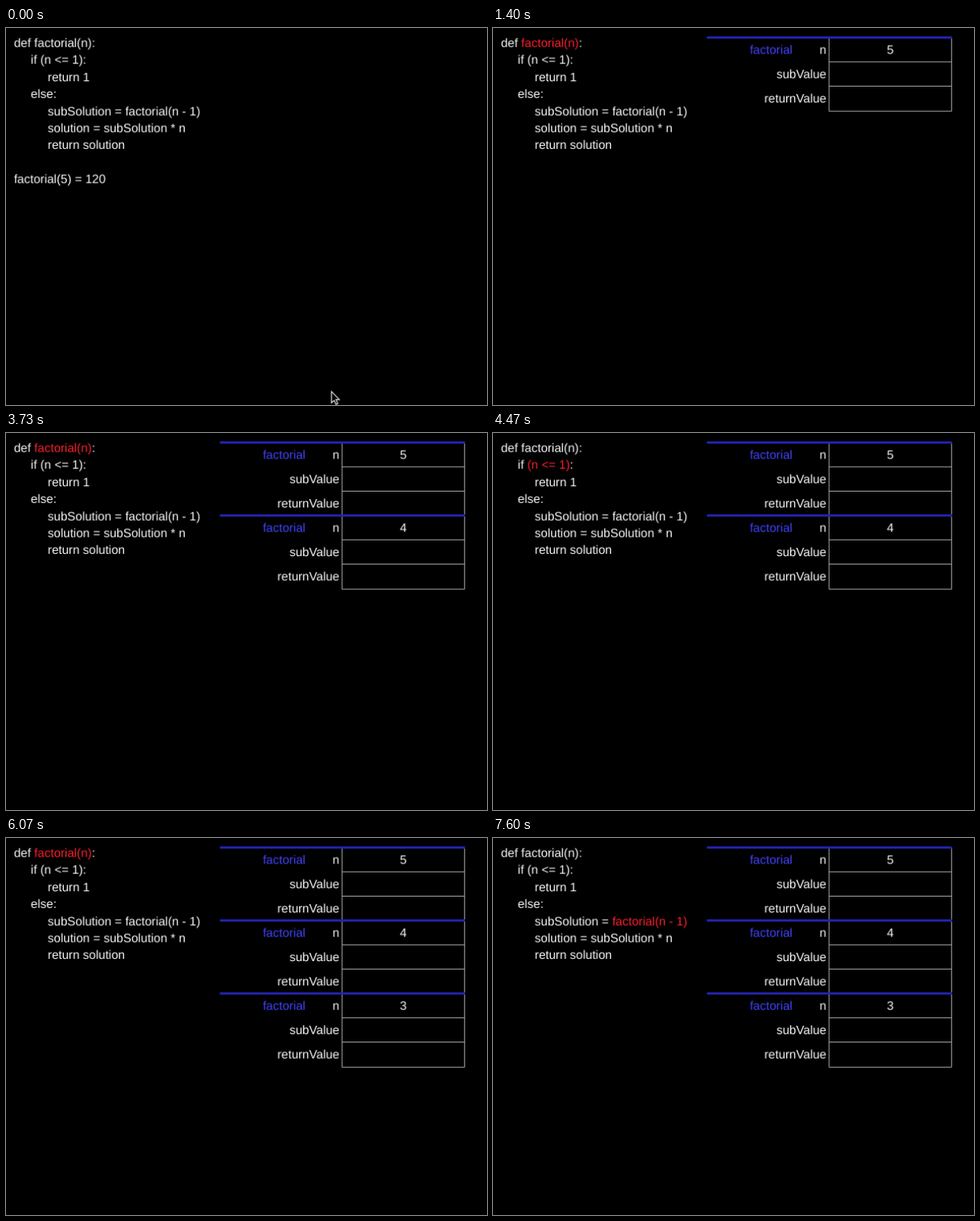
These frames come from a looping animation (640x502 px, 8000 ms). An HTML page with a canvas:

```html
<!DOCTYPE html>
<html lang="en">
<head>
<meta charset="utf-8">
<title>Factorial recursion</title>
<style>
  html, body { margin: 0; width: 100%; height: 100%; overflow: hidden; background: #000; }
  canvas { display: block; width: 640px; height: 502px; }
</style>
</head>
<body>
<!-- Drawn slightly small and scaled up, for the soft look of a resized recording -->
<canvas id="stage" width="632" height="496"></canvas>
<script>
const stage = document.getElementById('stage');
const ctx = stage.getContext('2d');
const LOOP = 8000;
const FONT = '16px "Liberation Sans", Arial, Helvetica, sans-serif';
const WHITE = '#fafafa', RED = '#ff2030', BLUE = '#4343ff', LINE = '#2424b4', GRAY = '#b0b0b0';
const MARGIN = 10.4, INDENT = 22.2;
const LEFT = 281, CELL = 441.5, RIGHT = 602.5, LABEL = 438, ROW = 32;

const CODE = [
  [0, 'def factorial(n):'],
  [1, 'if (n <= 1):'],
  [2, 'return 1'],
  [1, 'else:'],
  [2, 'subSolution = factorial(n - 1)'],
  [2, 'solution = subSolution * n'],
  [2, 'return solution']
];

// Highlighted part of a code line, in call order
const MARKS = [[0, 'factorial(n)'], [1, '(n <= 1)'], [4, 'factorial(n - 1)']];

// Start times of the steps; each third step opens a new call
const STEPS = [1400, 2130, 2930, 3730, 4470, 5270, 6070, 6870, 7600];

// Pointer tip: start time and place
const POINTER = [[0, 426.9, 477.2], [70, 366, 254], [135, 299, 24]];
const POINTER_END = 200;
const ARROW = new Path2D('M.7 1V16L4.2 12.7L6.6 18L9 17L6.7 11.7H11Z');

function text(str, x, y, color = WHITE, align = 'left') {
  ctx.fillStyle = color;
  ctx.textAlign = align;
  ctx.fillText(str, x, y);
}

function line(x1, y1, x2, y2, color = GRAY, width = 1) {
  ctx.strokeStyle = color;
  ctx.lineWidth = width;
  ctx.beginPath();
  ctx.moveTo(x1, y1);
  ctx.lineTo(x2, y2);
  ctx.stroke();
}

const lineY = i => Math.round(25 + i * 22.4);

function drawCode(mark) {
  CODE.forEach(([depth, str], i) => {
    let x = MARGIN + depth * INDENT;
    const hot = mark && mark[0] === i ? mark[1] : '';
    const at = hot ? str.indexOf(hot) : str.length;
    const parts = [str.slice(0, at), hot, str.slice(at + hot.length)];
    parts.forEach((part, k) => {
      text(part, x, lineY(i), k === 1 ? RED : WHITE);
      x += ctx.measureText(part).width;
    });
  });
}

function drawCall(index) {
  const top = 12.5 + index * 3 * ROW;
  const base = top + 21.5;
  const bottom = top + 3 * ROW + 1;
  line(CELL, top, CELL, bottom);
  line(RIGHT, top, RIGHT, bottom);
  line(CELL, top + ROW, RIGHT, top + ROW);
  line(CELL, top + 2 * ROW, RIGHT, top + 2 * ROW);
  line(CELL, bottom, RIGHT, bottom);
  line(LEFT, top, RIGHT + 0.5, top, LINE, 3);

  text('factorial', 393.4, base, BLUE, 'right');
  text('n', LABEL, base, WHITE, 'right');
  text('subValue', LABEL, base + ROW, WHITE, 'right');
  text('returnValue', LABEL, base + 2 * ROW, WHITE, 'right');
  text(String(5 - index), (CELL + RIGHT) / 2, base, WHITE, 'center');
}

function drawPointer(x, y) {
  ctx.save();
  ctx.translate(x, y);
  ctx.strokeStyle = '#eee';
  ctx.lineWidth = 1.2;
  ctx.fillStyle = '#000';
  ctx.fill(ARROW);
  ctx.stroke(ARROW);
  ctx.restore();
}

function draw(t) {
  ctx.fillStyle = '#000';
  ctx.fillRect(0, 0, stage.width, stage.height);
  ctx.font = FONT;
  ctx.textRendering = 'geometricPrecision';
  const step = STEPS.filter(s => s <= t).length - 1;
  drawCode(step < 0 ? null : MARKS[step % 3]);

  if (step < 0) {
    text('factorial(5) = 120', MARGIN, lineY(8));
    if (t < POINTER_END) {
      const [, x, y] = POINTER.filter(p => p[0] <= t).pop();
      drawPointer(x, y);
    }
    return;
  }
  const calls = Math.floor(step / 3) + 1;
  for (let i = 0; i < calls; i++) drawCall(i);
}

const start = performance.now();
function tick() {
  draw((performance.now() - start) % LOOP);
  requestAnimationFrame(tick);
}
tick();
</script>
</body>
</html>
```
